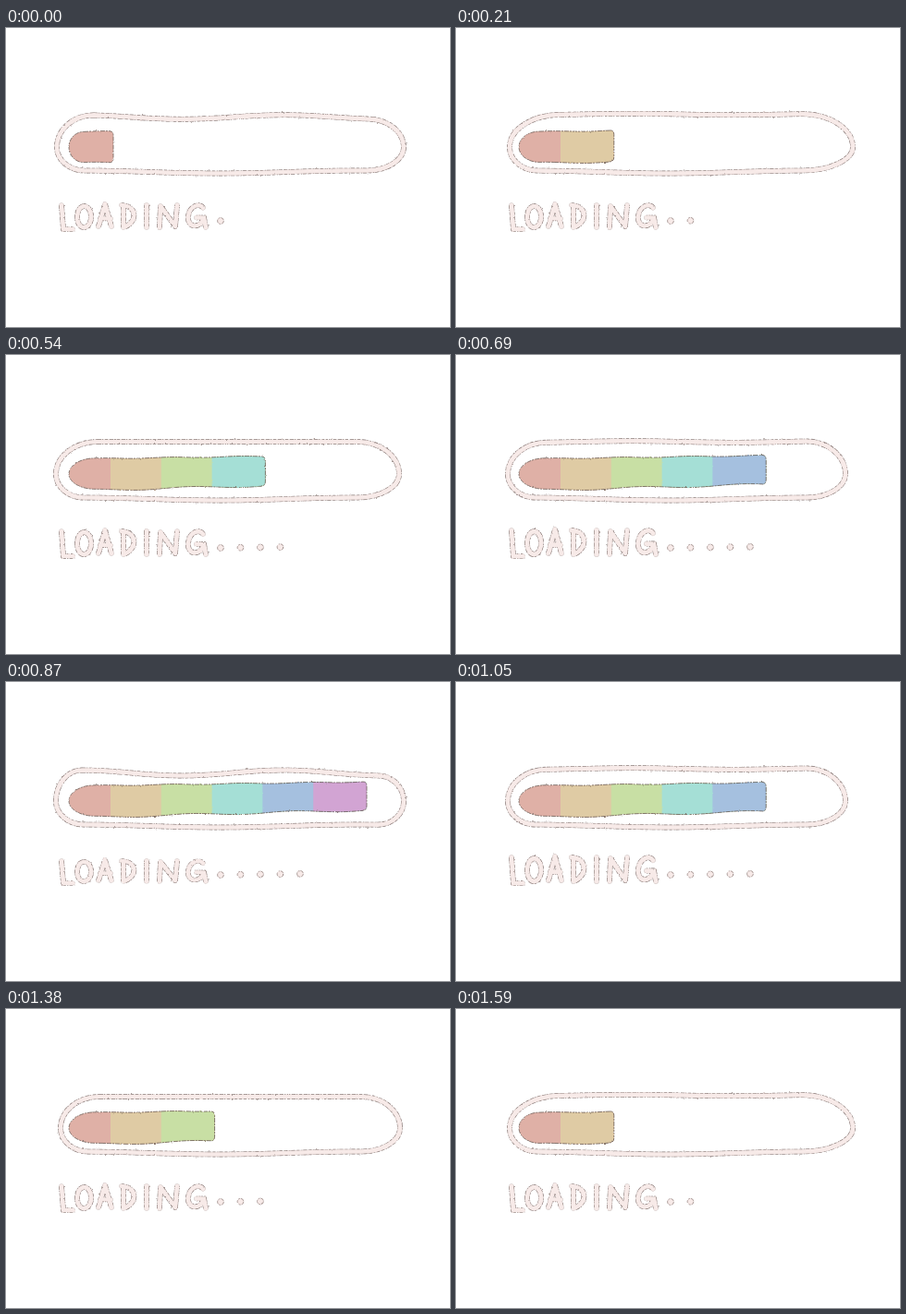
These frames come from a looping animation (480 by 324 pixels, 1.74 s). An HTML page:

```html
<!DOCTYPE html>
<html lang="en">
<head>
<meta charset="utf-8">
<title>Loading</title>
<style>
  html, body { margin: 0; width: 100%; height: 100%; overflow: hidden; background: #fff; }
  svg { display: block; width: 100%; height: 100%; }
  path { fill: none; stroke-linejoin: round; }
  .rim { stroke: #b5a29e; stroke-opacity: .6; stroke-width: 5.6; stroke-linecap: round; }
  .edge { stroke: #6b5b57; stroke-opacity: .7; stroke-width: 5.8; stroke-dasharray: 4 1 1 2 3 2; }
  .chalk { stroke: #f7eae8; stroke-width: 4.6; stroke-linecap: round; }
  .border { stroke: #655751; stroke-opacity: .75; stroke-dasharray: 5 1 2 1; }
  circle { fill: #f7eae8; stroke: #806d69; stroke-opacity: .7; stroke-width: .9; stroke-dasharray: 4 1 2 1; }
</style>
</head>
<body>
<svg id="stage" viewBox="0 0 480 324">
  <filter id="rough" filterUnits="userSpaceOnUse" x="0" y="0" width="480" height="324" color-interpolation-filters="sRGB">
    <feTurbulence type="fractalNoise" baseFrequency=".4" numOctaves="2" seed="4"/>
    <feDisplacementMap in="SourceGraphic" scale="2" xChannelSelector="R" yChannelSelector="G"/>
  </filter>
</svg>
<script>
const COLORS = ['#dfb0a6', '#dfcba4', '#c8dfa4', '#a5dfd6', '#a5c0df', '#d2a4d3'];
const BLOCK = 54.8;      // width of one colour block
const FIRST_SEAM = 113;
const MIDDLE = 129;      // height of the round ends

// The hand-drawn tube differs a little for each fill level.
const poses = [
  { left: 55, right: 430, top: 96.5, swell: 2.3, shoulder: 40, textTop: 190 },
  { left: 58, right: 429, top: 93.5, swell: -.7, shoulder: 55, textTop: 190 },
  { left: 59, right: 426, top: 95, swell: 0, shoulder: 42, textTop: 190 },
  { left: 54, right: 425, top: 94, swell: 0, shoulder: 45, textTop: 189 },
  { left: 56, right: 421, top: 94, swell: -.8, shoulder: 42, textTop: 188 },
  { left: 54, right: 430, top: 98.5, swell: 3, shoulder: 28, textTop: 192 }
];

// LOADING, drawn between y = 0 (top) and y = 28 (baseline)
const LETTERS = [
  'M60 2 L62 29 L72 29',
  'M84 3 C74 5 75 28 85 27 C95 25 94 3 84 3',
  'M100 26 L107 1 L114 26 M102 17 L113 17',
  'M127 3 L127 27 C142 22 143 3 125 2',
  'M152 2 L152 27',
  'M166 27 L167 3 L183 26 L185 2',
  'M213 5 C209 -1 198 3 197 15 C196 28 210 29 214 16 L206 16 M214 16 L216 27'
].join(' ');

const HOLDS = [180, 180, 180, 150, 180, 180, 180, 150, 180, 180];
const LOOP = HOLDS.reduce((sum, ms) => sum + ms);

const wave = (x, crest, period) => Math.cos((x - crest) / period * 2 * Math.PI);

// Points along y(x), evenly spaced from one x to another
function trace(from, to, y) {
  const count = Math.ceil(Math.abs(to - from) / 8);
  return Array.from({ length: count + 1 }, (_, i) => {
    const x = from + (to - from) * i / count;
    return [x, y(x)];
  });
}

// Clockwise outline: two wavy sides joined by elliptical ends
function capsule(upper, lower, left, right, middle) {
  const arc = ([x0, y0], [x1, y1]) => `A${Math.abs(x1 - x0)} ${Math.abs(y1 - y0)} 0 0 1 ${x1} ${y1}`;
  const tipL = [left, middle], tipR = [right, middle];
  return `M${upper.join('L')}` + arc(upper.at(-1), tipR) + arc(tipR, lower[0]) +
    `L${lower.join('L')}` + arc(lower.at(-1), tipL) + arc(tipL, upper[0]) + 'Z';
}

function tubePath({ left, right, top, swell, shoulder }) {
  const upper = x => top + swell * wave(x, 190, 220);
  const lower = x => 156 + 1.5 * wave(x, 230, 300);
  return capsule(trace(left + shoulder, right - shoulder, upper),
    trace(right - shoulder, left + 30, lower), left, right, MIDDLE);
}

function barPath(blocks) {
  const end = FIRST_SEAM + 3 + BLOCK * (blocks - 1);
  const nose = 68 + Math.min(28, 10 + 6 * blocks);
  const upper = x => 112 - .014 * (x - FIRST_SEAM) + .5 * wave(x, 140, 75);
  const lower = x => 146 - .026 * (x - FIRST_SEAM) + 1.2 * wave(x, 145, 110);
  const sides = capsule(trace(nose, end - 4, upper), trace(end - 4, nose, lower), 68, end, MIDDLE);
  // Square off the right end with small rounded corners.
  return sides.replace(/A.*?A.*?(?=L)/,
    `Q${end} ${upper(end)} ${end} ${upper(end) + 5}L${end} ${lower(end) - 5}Q${end} ${lower(end)} ${end - 4} ${lower(end)}`);
}

const chalk = d => ['rim', 'edge', 'chalk'].map(c => `<path class="${c}" d="${d}"/>`).join('');

function drawPose(pose, index) {
  const blocks = index + 1;
  const bar = barPath(blocks);
  // Later blocks are painted over the right part of earlier ones.
  const fills = COLORS.slice(0, blocks).map((color, i) =>
    `<rect x="${i && FIRST_SEAM + BLOCK * (i - 1)}" y="90" width="480" height="70" fill="${color}"/>`);
  const dots = Array.from({ length: Math.min(blocks, 5) }, (_, i) =>
    `<circle cx="${232 + 21.5 * i}" cy="${209 - .3 * i}" r="3.4"/>`);
  return `<g class="pose" filter="url(#rough)" display="none">
    <clipPath id="bar${index}"><path d="${bar}"/></clipPath>
    ${chalk(tubePath(pose))}
    <g clip-path="url(#bar${index})">${fills.join('')}</g>
    <path class="border" d="${bar}"/>
    <g transform="translate(0 ${pose.textTop}) scale(1 ${(217 - pose.textTop) / 28})">${chalk(LETTERS)}</g>
    ${dots.join('')}
  </g>`;
}

const stage = document.getElementById('stage');
stage.insertAdjacentHTML('beforeend', poses.map(drawPose).join(''));
const groups = [...stage.querySelectorAll('.pose')];

const begin = performance.now();
function render(now) {
  let t = Math.max(0, now - begin) % LOOP;
  let step = 0;
  while (t >= HOLDS[step]) t -= HOLDS[step++];
  const current = 5 - Math.abs(5 - step);   // fills up, then empties again
  groups.forEach((g, i) => g.setAttribute('display', i === current ? 'inline' : 'none'));
  requestAnimationFrame(render);
}
render(begin);
</script>
</body>
</html>
```
